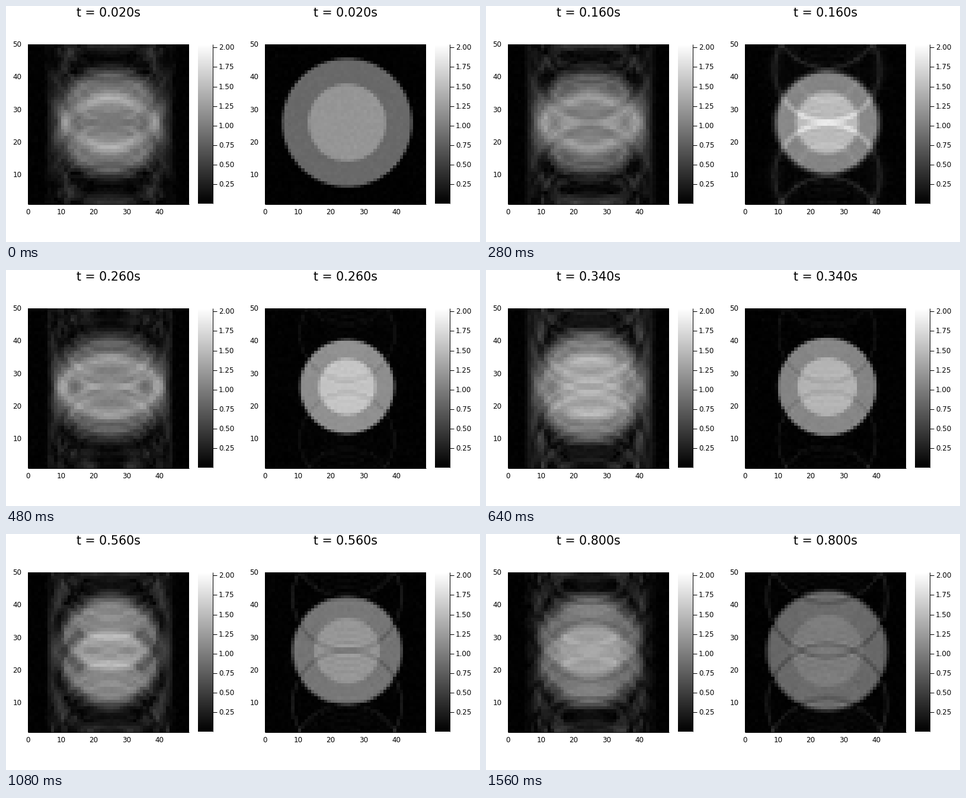
Animation of 800x400 px, one loop 1.6 s. Source, as a matplotlib script:

```python
import numpy as np
import matplotlib.pyplot as plt
from matplotlib.animation import FuncAnimation

N = 49             # image matrix and number of k-space lines
FRAMES = 40
STEP = 0.02        # seconds of heart time per frame
SWEEP = FRAMES * STEP
PERIOD = 0.975     # heart period in seconds
REST, SYSTOLE = 0.05, 0.225
PHASES = 250
VMAX = 2.04
PX = 0.72          # points per pixel


def heart_state(t):
    """Outer radius, wall level and cavity level at time t of the cycle."""
    if t < SYSTOLE:
        u = np.clip((t - REST) / (SYSTOLE - REST), 0, 1)
        squeeze = (1 - np.cos(np.pi * u)) / 2
        return 19.7 - 5.6 * squeeze, 105 + 45 * squeeze, 149 + 57 * squeeze
    u = (t - SYSTOLE) / (PERIOD - SYSTOLE)
    return 14.1 + 5.4 * u ** 0.95, 150 - 55 * u ** 0.6, 206 - 102 * u ** 0.7


def disc(dist, radius):
    return np.clip(radius - dist + 0.5, 0, 1)


def build_spectra():
    """Spectrum of the two-disc heart over one cycle."""
    axis = np.arange(N) + 0.5 - 25
    dist = np.hypot(axis[:, None], axis[None, :])
    spectra = []
    for t in np.arange(PHASES) * PERIOD / PHASES:
        radius, wall, cavity = heart_state(t)
        heart = wall * disc(dist, radius) + (cavity - wall) * disc(dist, 0.6 * radius)
        spectra.append(np.fft.fftshift(np.fft.fft2(heart * VMAX / 255)))
    return np.array(spectra)


SPECTRA = build_spectra()
KY, KX = np.mgrid[0:N, 0:N]
READOUT = (KX / N - 0.5) * STEP


def ungated_time(t):
    """Lines follow each other at a fixed rate, whatever the heart does."""
    return t + SWEEP * KY + READOUT


def gated_time(t):
    """Each line starts with a beat; beat length varies over three beats."""
    return t * (1 - 0.1 * np.cos(2 * np.pi * KY / 3)) + READOUT


def reconstruct(times, seed):
    pos = times / PERIOD % 1 * PHASES
    low = np.floor(pos).astype(int)
    mix = pos - low
    data = (SPECTRA[low % PHASES, KY, KX] * (1 - mix)
            + SPECTRA[(low + 1) % PHASES, KY, KX] * mix)
    rng = np.random.default_rng(seed)
    noise = rng.normal(0, 0.014, (2, N, N))
    return np.abs(np.fft.ifft2(np.fft.ifftshift(data)) + noise[0] + 1j * noise[1])


plt.rcParams["font.family"] = "DejaVu Sans"
fig = plt.figure(figsize=(8, 4), dpi=100, facecolor="white")
ax = fig.add_axes([0, 0, 1, 1])
ax.axis("off")


def label(x, y, text, ha, size=11.9):
    return ax.text(x, y, text, ha=ha, va="baseline", fontsize=size * PX, color="black")


def line(xs, ys):
    ax.plot(xs, ys, color="black", lw=PX, solid_capstyle="butt")


def picture(data, left, right, bottom, top):
    return ax.imshow(data, cmap="gray", vmin=0, vmax=VMAX, origin="lower",
                     extent=(left, right, bottom, top), aspect="auto",
                     interpolation="nearest")


def panel(x0):
    """One heatmap with axes, colour bar and title; returns the moving parts."""
    left, right, bottom, top = x0 + 37, x0 + 309, 336, 65
    unit = 271 / N
    image = picture(np.zeros((N, N)), left, right, bottom, top)
    line([left + 0.5, left + 0.5], [top, bottom])
    line([left, right], [bottom - 0.5, bottom - 0.5])
    for v in range(0, 50, 10):
        label(left + 0.5 + v * unit, 353, str(v), "center")
    for v in range(10, 60, 10):
        label(x0 + 26.5, bottom - (v - 1) * unit + 4, str(v), "right")

    bar = x0 + 349
    ramp = np.linspace(0, VMAX, 256)[:, None]
    picture(ramp, x0 + 324, bar, 335, 65)
    line([bar - 0.5, bar - 0.5], [65, 335])
    for k in range(1, 9):
        y = 335 - k * 0.25 * 132.3
        line([bar, x0 + 356], [y, y])
        label(x0 + 359, y + 4, f"{k * 0.25:.2f}", "left")
    return image, label(x0 + 173, 18, "", "center", 20.7)


panels = [(*panel(0), ungated_time), (*panel(400), gated_time)]
ax.set_xlim(0, 800)
ax.set_ylim(400, 0)


def update(i):
    t = (i + 1) * STEP
    artists = []
    for side, (image, title, sample_time) in enumerate(panels):
        image.set_data(reconstruct(sample_time(t), 2 * i + side))
        title.set_text(f"t = {t:.3f}s")
        artists += [image, title]
    return artists


anim = FuncAnimation(fig, update, frames=FRAMES, interval=40, repeat=True,
                     repeat_delay=0, blit=False)
plt.show()
```
